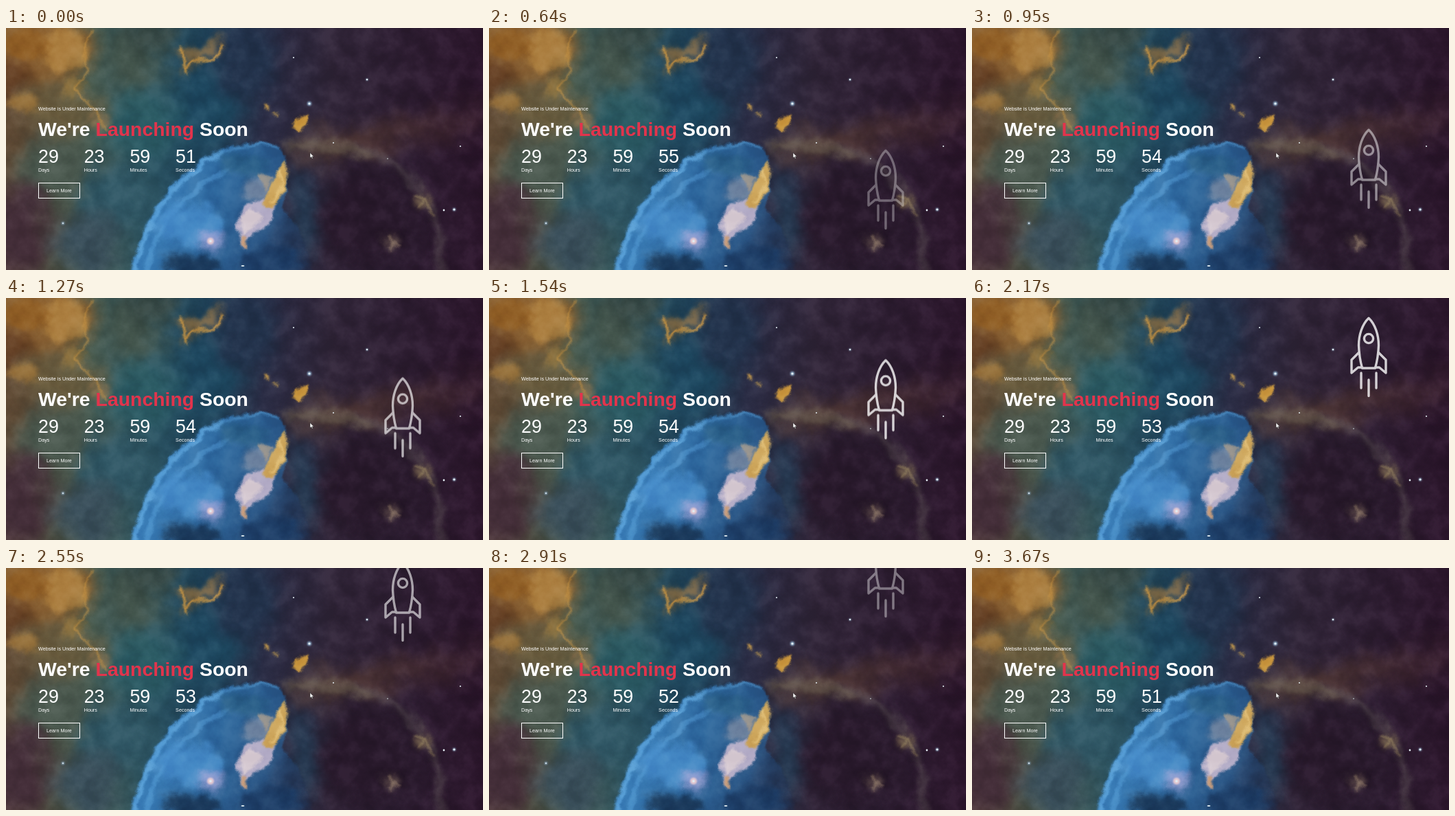
An HTML page for the animation above (3.7 s loop, 695 by 352 pixels).

```html
<!DOCTYPE html>
<html lang="en">
<head>
<meta charset="utf-8">
<title>Launching Soon</title>
<style>
  html, body { margin: 0; width: 100%; height: 100%; overflow: hidden; background: #2a1c2e; }
  body { position: relative; font: 7.2px/10px "Liberation Sans", Arial, sans-serif; color: #fff; }
  body > * { position: absolute; margin: 0; white-space: nowrap; }
  svg { left: 0; top: 0; width: 695px; height: 352px; overflow: hidden; }
  filter { color-interpolation-filters: sRGB; }
  .grain { mix-blend-mode: soft-light; opacity: .17; }

  .note { left: 47px; top: 112.5px; }
  h1 { left: 47px; top: 131px; font-size: 28.4px; line-height: 32px; }
  h1 em { font-style: normal; color: #e2344c; }
  .unit { top: 172px; }
  .unit b { display: flex; height: 31px; overflow: hidden; font: 26.8px/31px "Liberation Sans", Arial, sans-serif; }
  .unit span { position: absolute; left: 0; top: 29.5px; }
  .reel { font-style: normal; white-space: pre; animation: tick 3.7s step-end infinite; }
  .more { left: 47px; top: 225px; width: 61px; height: 23px; box-sizing: border-box;
          border: 1px solid #fff; display: flex; align-items: center; justify-content: center; }

  .rocket { animation: rise 3.7s linear infinite, glow 3.7s linear infinite; will-change: transform, opacity; }
  @keyframes rise { from { transform: translateY(238.5px); } to { transform: translateY(-122px); } }
  @keyframes glow { 0%, 100% { opacity: 0; } 50% { opacity: .96; } }
  @keyframes tick {
    0% { transform: none; }
    1.89% { transform: translateY(-31px); }
    23.1% { transform: translateY(-62px); }
    48.1% { transform: translateY(-93px); }
    73.1% { transform: translateY(-124px); }
    98.1%, 100% { transform: translateY(-155px); }
  }
</style>
</head>
<body>
<svg viewBox="0 0 695 352">
  <defs>
    <linearGradient id="sky">
      <stop offset="0" stop-color="#574333"/>
      <stop offset=".18" stop-color="#44594f"/>
      <stop offset=".3" stop-color="#2a5261"/>
      <stop offset=".42" stop-color="#1f4259"/>
      <stop offset=".54" stop-color="#2a2c44"/>
      <stop offset=".68" stop-color="#302538"/>
      <stop offset="1" stop-color="#2a152a"/>
    </linearGradient>
    <linearGradient id="dome" gradientUnits="userSpaceOnUse" x1="205" y1="240" x2="440" y2="330">
      <stop offset="0" stop-color="#3d84c0"/>
      <stop offset=".4" stop-color="#2e679c"/>
      <stop offset=".72" stop-color="#2a5584"/>
      <stop offset="1" stop-color="#24304f" stop-opacity=".5"/>
    </linearGradient>
    <linearGradient id="band" gradientUnits="userSpaceOnUse" x1="400" y1="0" x2="695" y2="0">
      <stop offset="0" stop-color="#5d4a40" stop-opacity=".4"/>
      <stop offset=".25" stop-color="#624538"/>
      <stop offset="1" stop-color="#4a2c33" stop-opacity=".5"/>
    </linearGradient>
    <filter id="haze" filterUnits="userSpaceOnUse" x="-60" y="-60" width="815" height="472">
      <feTurbulence type="fractalNoise" baseFrequency=".018" numOctaves="5" seed="4" result="n"/>
      <feGaussianBlur in="SourceGraphic" stdDeviation="15" result="b"/>
      <feDisplacementMap in="b" in2="n" scale="45" xChannelSelector="R" yChannelSelector="G"/>
    </filter>
    <filter id="cloud" filterUnits="userSpaceOnUse" x="-60" y="-60" width="815" height="472">
      <feTurbulence type="fractalNoise" baseFrequency=".035" numOctaves="5" seed="9" result="n"/>
      <feGaussianBlur in="SourceGraphic" stdDeviation="5" result="b"/>
      <feDisplacementMap in="b" in2="n" scale="22" xChannelSelector="R" yChannelSelector="G"/>
    </filter>
    <filter id="wisp" filterUnits="userSpaceOnUse" x="-60" y="-60" width="815" height="472">
      <feTurbulence type="fractalNoise" baseFrequency=".06" numOctaves="4" seed="2" result="n"/>
      <feGaussianBlur in="SourceGraphic" stdDeviation="1.8" result="b"/>
      <feDisplacementMap in="b" in2="n" scale="11" xChannelSelector="R" yChannelSelector="G"/>
    </filter>
    <filter id="grain" x="0" y="0" width="1" height="1">
      <feTurbulence type="fractalNoise" baseFrequency=".035" numOctaves="6" seed="7"/>
      <feColorMatrix values="2 0 0 0 -.5  2 0 0 0 -.5  2 0 0 0 -.5  0 0 0 0 1"/>
    </filter>
    <filter id="blur" x="-1" y="-1" width="3" height="3"><feGaussianBlur stdDeviation="1.3"/></filter>
  </defs>

  <rect width="695" height="352" fill="url(#sky)"/>

  <g filter="url(#haze)">
    <ellipse cx="45" cy="25" rx="75" ry="60" fill="#8a6132"/>
    <ellipse cx="0" cy="70" rx="32" ry="32" fill="#633d22"/>
    <ellipse cx="185" cy="45" rx="45" ry="55" fill="#45574e"/>
    <ellipse cx="215" cy="5" rx="40" ry="25" fill="#33433f"/>
    <ellipse cx="350" cy="45" rx="45" ry="60" fill="#23334c"/>
    <ellipse cx="75" cy="120" rx="65" ry="25" fill="#6f6040"/>
    <ellipse cx="5" cy="165" rx="30" ry="40" fill="#604a34"/>
    <ellipse cx="205" cy="140" rx="65" ry="45" fill="#2c5c65"/>
    <ellipse cx="70" cy="205" rx="60" ry="45" fill="#4c5a50"/>
    <ellipse cx="165" cy="245" rx="55" ry="50" fill="#2f5664"/>
    <ellipse cx="15" cy="300" rx="50" ry="65" fill="#452f3a"/>
    <ellipse cx="120" cy="315" rx="45" ry="50" fill="#3a4f5b"/>
    <ellipse cx="290" cy="120" rx="50" ry="50" fill="#1e4860"/>
    <ellipse cx="430" cy="275" rx="26" ry="70" fill="#263a52"/>
    <path d="M415 178C480 166 600 152 710 128" fill="none" stroke="url(#band)" stroke-width="30"/>
    <ellipse cx="530" cy="275" rx="72" ry="75" fill="#28192b"/>
  </g>

  <g filter="url(#cloud)">
    <ellipse cx="88" cy="32" rx="32" ry="32" fill="#b98a45" opacity=".7"/>
    <ellipse cx="30" cy="22" rx="35" ry="22" fill="#935e22" opacity=".7"/>
    <ellipse cx="22" cy="108" rx="26" ry="12" fill="#b0803c" opacity=".65"/>
    <ellipse cx="98" cy="88" rx="16" ry="14" fill="#a8823f" opacity=".6"/>
    <ellipse cx="135" cy="138" rx="18" ry="14" fill="#a68055" opacity=".55"/>
    <path d="M252 28L285 34 315 5 308 42 272 52 262 66Z" fill="#94703f" opacity=".75"/>
    <path d="M425 176C485 162 565 175 605 240C628 275 636 310 632 360" fill="none" stroke="#6b6060" stroke-width="9" opacity=".5"/>
    <path d="M405 172C440 166 490 172 535 188" fill="none" stroke="#6f6350" stroke-width="12" opacity=".55"/>
    <ellipse cx="606" cy="252" rx="12" ry="12" fill="#75614b" opacity=".75"/>
    <ellipse cx="562" cy="310" rx="12" ry="10" fill="#62504c" opacity=".7"/>
  </g>

  <g filter="url(#wisp)">
    <path d="M181 360C194 290 235 215 310 178C340 164 380 163 398 172C416 188 410 230 404 262C428 290 440 320 446 360Z" fill="url(#dome)"/>
    <g fill="none" stroke="#60a8df">
      <path d="M186 360C198 290 240 220 316 180" stroke-width="7" opacity=".75"/>
      <path d="M205 355C214 300 250 240 322 208" stroke-width="8" opacity=".45"/>
      <path d="M316 181C345 168 375 166 397 174" stroke-width="4" opacity=".5"/>
    </g>
    <g fill="none" stroke="#d19a45" stroke-width="4">
      <path d="M124 0L112 42 120 62 98 90 124 112 148 150" stroke-width="3" opacity=".6"/>
      <path d="M254 28L262 64 272 48 304 46 316 24" opacity=".85"/>
    </g>
    <path d="M417 143L425 130 440 128 438 144 428 150Z" fill="#c9973f"/>
    <path d="M376 108L383 113 383 121 378 118Z" fill="#b38c46"/>
    <path d="M390 122l6 6" stroke="#8c7346" stroke-width="4"/>
  </g>

  <g filter="url(#cloud)">
    <ellipse cx="270" cy="285" rx="50" ry="30" fill="#4d93cf" opacity=".8"/>
    <ellipse cx="345" cy="198" rx="32" ry="18" fill="#295d84" opacity=".8"/>
    <ellipse cx="270" cy="345" rx="42" ry="16" fill="#17314f" opacity=".85"/>
    <ellipse cx="385" cy="342" rx="45" ry="24" fill="#1d3e66" opacity=".9"/>
    <ellipse cx="300" cy="309" rx="18" ry="13" fill="#a2a6d8" opacity=".8"/>
    <ellipse cx="370" cy="235" rx="22" ry="18" fill="#8a95a8" opacity=".7"/>
  </g>
  <g filter="url(#wisp)">
    <path d="M344 322L336 285 344 258 370 250 394 246 386 282 360 300Z" fill="#b5aec8"/>
    <path d="M344 302L341 274 356 262 374 274 362 290Z" fill="#e2d4d8" opacity=".8"/>
    <path d="M406 192L413 205 405 238 386 264 372 258 388 225Z" fill="#cda65c"/>
    <path d="M400 205L402 232 384 256" fill="none" stroke="#eccd88" stroke-width="4" opacity=".7"/>
    <path d="M366 212L390 216 378 238Z" fill="#a89a86" opacity=".75"/>
    <path d="M342 302L352 304 350 322 344 320Z" fill="#c79d7c"/>
    <path d="M555 300L564 313 575 318M560 322L566 310" fill="none" stroke="#8b7464" stroke-width="3" opacity=".8"/>
    <path d="M596 242L608 248 622 272M602 262L609 247" fill="none" stroke="#93805f" stroke-width="3" opacity=".7"/>
  </g>
  <rect class="grain" width="695" height="352" filter="url(#grain)"/>

  <g fill="#a9d5f5" filter="url(#blur)" opacity=".8">
    <circle cx="442" cy="110" r="3"/>
    <circle cx="526" cy="75" r="1.6"/>
    <circle cx="653" cy="264" r="2.2"/>
    <circle cx="83" cy="284" r="2"/>
    <circle cx="298" cy="310" r="5" fill="#ffd9d4"/>
  </g>
  <g fill="#e2edf2">
    <circle cx="442" cy="110" r="1.6"/>
    <circle cx="526" cy="75" r="1.3"/>
    <circle cx="419" cy="43" r="1.1"/>
    <circle cx="477" cy="167" r="1"/>
    <circle cx="662" cy="172" r="1.1"/>
    <circle cx="638" cy="265" r="1.4"/>
    <circle cx="653" cy="264" r="1.6"/>
    <circle cx="556" cy="190" r=".8"/>
    <circle cx="83" cy="284" r="1"/>
    <circle cx="298" cy="310" r="1.8"/>
    <ellipse cx="345" cy="346" rx="2.5" ry="1"/>
  </g>
  <path d="M443 181.5v7.5l1.8-1.6 1.2 2.7 1.2-.6-1.2-2.6h2.4z" fill="#fff" stroke="#222" stroke-width=".5"/>
</svg>

<p class="note">Website is Under Maintenance</p>
<h1>We're <em>Launching</em> Soon</h1>
<div class="unit" style="left:47px"><b>29</b><span>Days</span></div>
<div class="unit" style="left:113.7px"><b>23</b><span>Hours</span></div>
<div class="unit" style="left:180.4px"><b>59</b><span>Minutes</span></div>
<div class="unit" style="left:247.1px"><b>5<i class="reel">1
5
4
3
2
1</i></b><span>Seconds</span></div>
<div class="more">Learn More</div>

<svg class="rocket" style="left:548px;width:60px;height:120px" viewBox="-30 0 60 120"
     fill="none" stroke="#fff" stroke-width="3.4" stroke-linejoin="round" stroke-linecap="round">
  <path d="M0 2.2C-9.5 11-14.5 27-14.5 42C-14 55-12 66-9.5 75H9.5C12 66 14 55 14.5 42C14.5 27 9.5 11 0 2.2Z"/>
  <circle cy="32" r="6.6"/>
  <path d="M-14 52L-25 63V82L-15.5 74H-9.5M14 52L25 63V82L15.5 74H9.5"/>
  <path d="M-11 82V104M0 92V115.5M11 82V104"/>
</svg>
</body>
</html>
```
